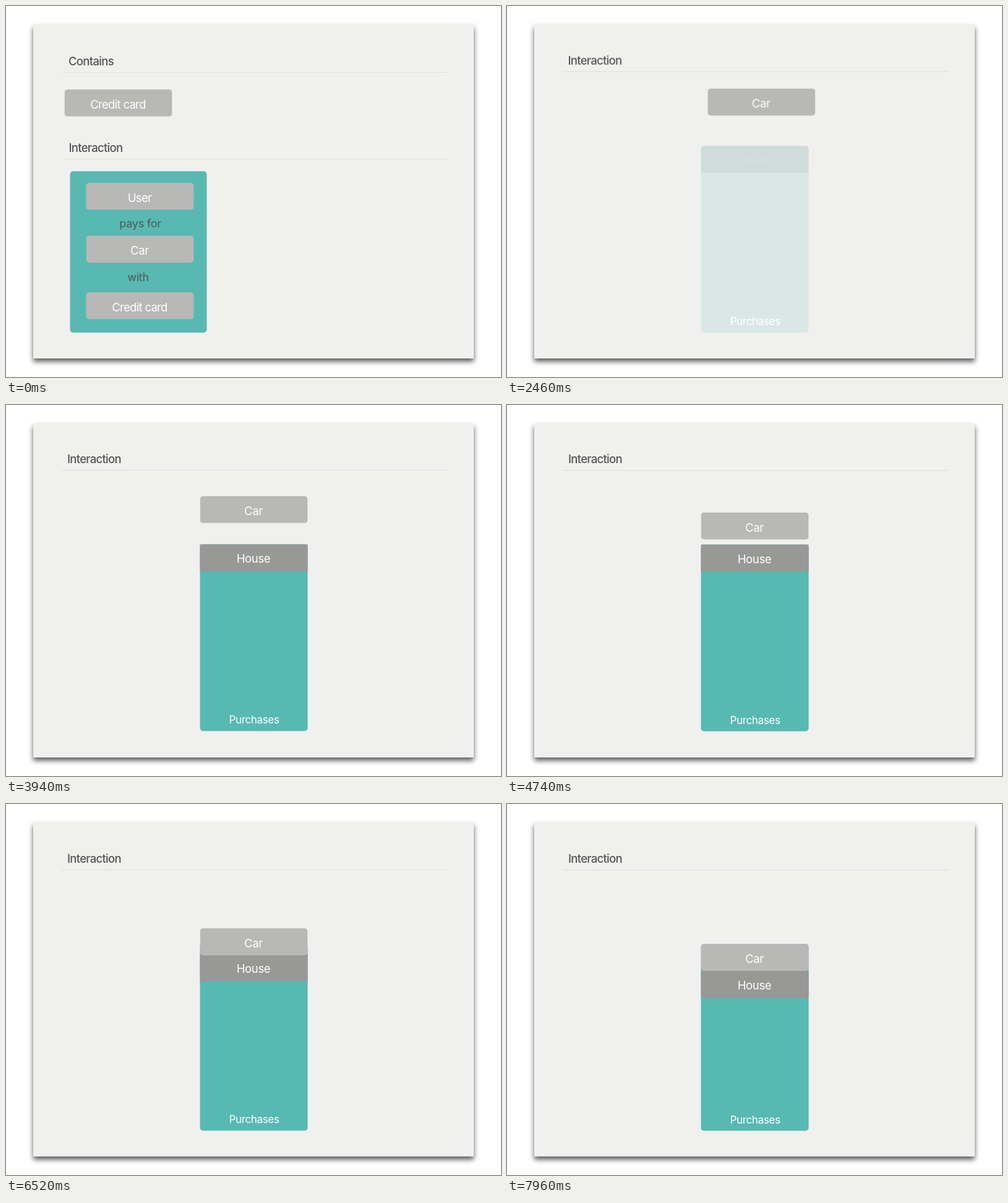
Recreate the animation shown at these times as an HTML page. Size 800 px wide and 600 px high, loop 8000 ms.

```html
<!DOCTYPE html>
<html lang="en">
<head>
<meta charset="utf-8">
<title>Interaction cards</title>
<style>
  html, body { margin: 0; width: 100%; height: 100%; overflow: hidden; background: #fff; }
  .page {
    position: absolute; left: 44px; top: 30px; width: 712px; height: 540px;
    background: #f0f0ef; box-shadow: 0 5px 8px rgba(0, 0, 0, .65);
  }
  svg { position: absolute; left: 0; top: 0; }
  text { font: 400 18.5px Inter, sans-serif; letter-spacing: -.35px; fill: #fff; text-anchor: middle; }
  .tight { letter-spacing: -.7px; }
  .title { font-weight: 500; letter-spacing: -.7px; fill: #555; text-anchor: start; }
  .verb { font-size: 18px; letter-spacing: -.25px; fill: #555; }
  .label { font-size: 17px; }
  .rule { fill: #dcdcdd; }
  .card { fill: #b8b8b7; }
  .teal { fill: #57b9b2; }
  .dark { fill: #989897; }

  /* one shared 8 s clock; 1% = 80 ms */
  .anim { animation: 8s linear infinite; }
  .contains { animation-name: contains; }
  .panel { animation-name: panel; }
  .heading { animation-name: heading; }
  .credit { animation-name: credit; }
  .car { animation-name: car; }
  .house { animation-name: house; }
  .drift { animation-name: drift; }
  .fade { animation-name: fade; }
  .name { animation-name: name; }
  .corner { animation-name: fade, corner; }

  @keyframes contains { 0% { opacity: 1 } 3.5%, 100% { opacity: 0 } }
  @keyframes panel { 0% { opacity: 1 } 5.5%, 100% { opacity: 0 } }
  @keyframes fade { 0%, 29.25% { opacity: 0 } 39.25%, 100% { opacity: 1 } }
  @keyframes name { 0%, 29.25% { opacity: 0 } 30.5%, 100% { opacity: 1 } }
  @keyframes corner { 0%, 30.75% { rx: 5px } 39.25%, 100% { rx: 0 } }

  @keyframes heading {
    0% { transform: translate(2.5px, 140.5px); animation-timing-function: cubic-bezier(.4, 0, .2, 1) }
    10.25% { transform: translate(-1px, .4px) }
    20% { transform: translate(-1px, .2px) }
    30.75% { transform: translate(-.5px, -.7px) }
    49.25% { transform: translate(0, -1.3px) }
    75.25% { transform: translate(0, -.6px) }
    88%, 100% { transform: none }
  }
  @keyframes drift {
    0%, 30.75% { transform: translateY(-.3px) }
    49.25% { transform: translateY(-1.2px) }
    75.25% { transform: translateY(-.4px) }
    88%, 100% { transform: none }
  }
  @keyframes credit {
    0% { transform: translate(94.5px, 135px); opacity: 1; animation-timing-function: cubic-bezier(.4, 0, .2, 1) }
    10.25%, 29.1% { transform: translate(216.2px, 134.5px); opacity: 1 }
    30.6%, 100% { transform: translate(216.2px, 134.5px); opacity: 0 }
  }
  @keyframes car {
    0% { transform: translate(129.5px, 371.3px); animation-timing-function: cubic-bezier(.4, 0, .2, 1) }
    10.25%, 29.1% { transform: translate(409.2px, 134.5px); animation-timing-function: cubic-bezier(.16, 1, .3, 1) }
    34.4%, 38% { transform: translate(313.5px, 133.4px); animation-timing-function: ease-in-out }
    69.5% { transform: translate(313.5px, 185.3px) }
    72.25% { transform: translate(313.5px, 185.5px); animation-timing-function: cubic-bezier(.57, 0, .71, .5) }
    82.9% { transform: translate(313.5px, 206px); animation-timing-function: cubic-bezier(.2, .5, .45, 1) }
    100% { transform: translate(313.5px, 226.3px) }
  }
  @keyframes house {
    0%, 72.25% { transform: translate(313.5px, 226.6px); animation-timing-function: cubic-bezier(.57, 0, .71, .5) }
    82.9% { transform: translate(313.5px, 248.3px); animation-timing-function: cubic-bezier(.2, .5, .45, 1) }
    100% { transform: translate(313.5px, 270px) }
  }
</style>
</head>
<body>
<div class="page"></div>
<svg width="800" height="600" viewBox="0 0 800 600">
  <defs><rect id="box" width="174" height="43.6" rx="5"/></defs>

  <g class="anim contains">
    <text class="title" x="101" y="96">Contains</text>
    <rect class="rule" x="92" y="107" width="623" height="1"/>
  </g>

  <g class="anim heading">
    <text class="title" x="99" y="95.2">Interaction</text>
    <rect class="rule" x="90" y="106.3" width="623" height="1"/>
  </g>

  <g class="anim panel">
    <rect class="teal" x="103.5" y="267.3" width="221" height="261" rx="5"/>
    <use href="#box" class="card" x="129.5" y="286"/>
    <text class="tight" x="216" y="317">User</text>
    <text class="verb" x="217" y="357.5">pays for</text>
    <text class="verb" x="213.5" y="444.5">with</text>
    <use href="#box" class="card" x="129.5" y="463"/>
    <text class="tight" x="216" y="494">Credit card</text>
  </g>

  <g class="anim drift">
    <rect class="anim fade teal" x="313.5" y="226.4" width="174" height="302" rx="5"/>
    <text class="anim name label" x="401" y="516.5">Purchases</text>
    <g class="anim house">
      <rect class="anim corner dark" width="174" height="43.6"/>
      <text class="anim fade" x="86.5" y="30">House</text>
    </g>
  </g>

  <g class="anim credit">
    <use href="#box" class="card"/>
    <text class="tight" x="86.5" y="31">Credit card</text>
  </g>
  <g class="anim car">
    <use href="#box" class="card"/>
    <text x="86.5" y="31">Car</text>
  </g>
</svg>
</body>
</html>
```
